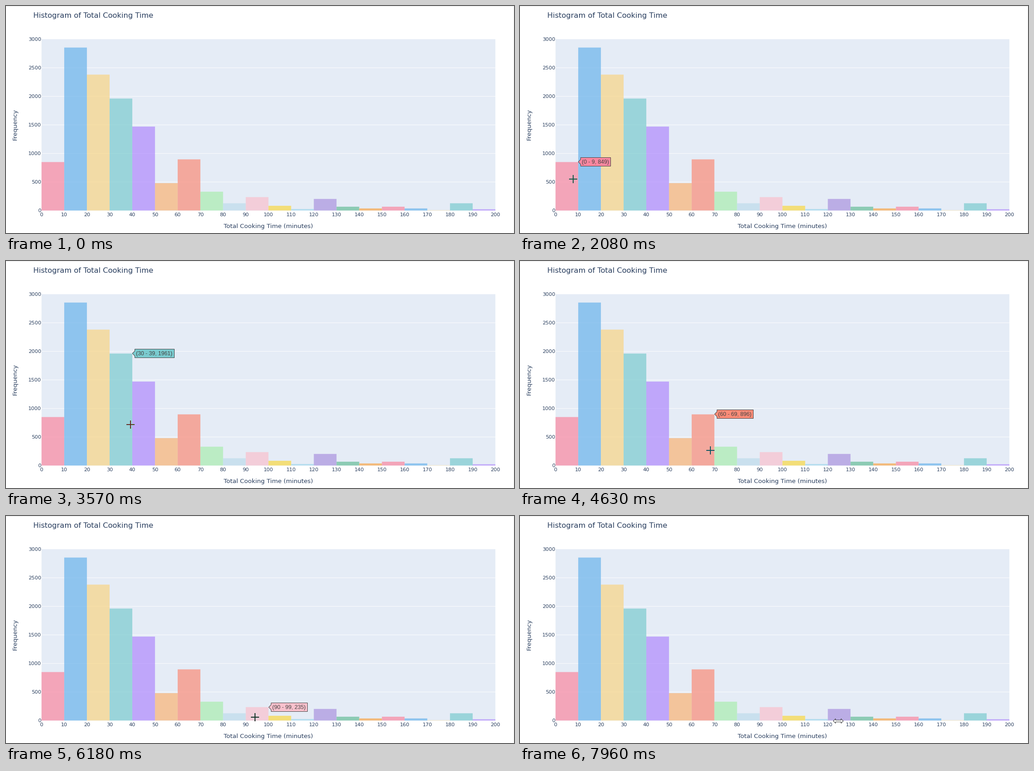
Recreate the animation shown at these times as a matplotlib script. Size 1118 by 501 pixels, loop 7.99 s.

```python
import matplotlib.pyplot as plt
import numpy as np
from matplotlib.animation import FuncAnimation
from matplotlib.colors import to_rgb

W, H, DPI = 1118, 501, 64
PX = 72 / DPI  # points per pixel
FRAMES, STEP = 235, 34
LEFT, RIGHT, TOP, BASE = 78.2, 1077, 73.3, 451.4
BIN = (RIGHT - LEFT) / 20
INK, OUTLINE = "#2a3f5f", "#444444"
LAG = 50  # ms before the hover label follows the pointer

COUNTS = [849, 2854, 2380, 1961, 1470, 480, 896, 330, 127, 235,
          83, 27, 203, 67, 37, 67, 37, 5, 127, 22]
PALETTE = ("#fa87a0 #6ab3eb #f8d584 #7acbcf #af89fd #f9b474 #f98b77 #a9edaf "
           "#bddceb #f9c1cd #f9d943 #a3d7ed #a992de #67be98 #f9a545").split()

# key points of the pointer path: ms, x, y
TRACK = np.array([
    (140, 671, 492), (200, 493, 484), (550, 493, 484),
    (1310, 111, 463), (1450, 111, 463), (1640, 90, 452),
    (2240, 132, 362), (2730, 173, 337), (3050, 241, 330),
    (3570, 271, 359), (3930, 341, 406), (4240, 341, 406),
    (4630, 417, 418), (5030, 481, 435), (5840, 521, 444),
    (6400, 559, 444), (6680, 559, 444), (7960, 700, 452)], float)
TIMES, SPOTS = TRACK[:, 0], TRACK[:, 1:]
SLOPES = np.gradient(SPOTS, TIMES, axis=0)
rest = np.all(np.diff(SPOTS, axis=0) == 0, axis=1)
SLOPES[:-1][rest] = 0
SLOPES[1:][rest] = 0


def pointer(t):
    """Smooth position along the path, None before the pointer enters."""
    if t < TIMES[0]:
        return None
    t = min(t, TIMES[-1])
    i = min(np.searchsorted(TIMES, t, side="right") - 1, len(TIMES) - 2)
    dt = TIMES[i + 1] - TIMES[i]
    u = (t - TIMES[i]) / dt
    a, b = SPOTS[i], SPOTS[i + 1]
    return (a + (b - a) * u * u * (3 - 2 * u)
            + dt * u * (1 - u) * ((1 - u) * SLOPES[i] - u * SLOPES[i + 1]))


def level(count):
    return BASE - count * (BASE - TOP) / 3000


def edge(k):
    return LEFT + k * BIN


def bar_color(k):
    return to_rgb(PALETTE[k % len(PALETTE)])


# static chart
scene = np.ones((H, W, 3))


def cover(a, b, n):
    """Share of each of n pixels that lies between a and b."""
    i = np.arange(n)
    return np.clip(np.minimum(b, i + 1) - np.maximum(a, i), 0, 1)


def fill(x0, y0, x1, y1, color, alpha=1.0):
    weight = alpha * np.outer(cover(y0, y1, H), cover(x0, x1, W))[..., None]
    scene[:] += (np.array(to_rgb(color)) - scene) * weight


fill(0, 0, W, 1, "#e6e6e6")
fill(W - 1, 0, W, H, "#f0f0f0")
fill(LEFT, TOP, RIGHT, BASE, "#e5ecf6")
for value in range(500, 3000, 500):
    fill(LEFT, level(value) - 0.47, RIGHT, level(value) + 0.47, "white")
for k, count in enumerate(COUNTS):
    fill(edge(k), level(count), edge(k + 1), BASE, bar_color(k), 0.7)

plt.rcParams["font.family"] = "DejaVu Sans"
fig = plt.figure(figsize=(W / DPI, H / DPI), dpi=DPI, facecolor="white")
ax = fig.add_axes([0, 0, 1, 1])
ax.axis("off")


def picture(pixels, **kw):
    h, w = pixels.shape[:2]
    return ax.imshow(pixels, extent=(0, w, h, 0), aspect="auto",
                     interpolation="nearest", **kw)


picture(scene)
cross = picture(np.zeros((18, 18, 4)), zorder=6)
ax.set_xlim(0, W)
ax.set_ylim(H, 0)


def label(x, y, text, size, **kw):
    kw = {"color": INK, "va": "baseline", **kw}
    return ax.text(x, y, text, fontsize=size * PX, **kw)


label(60, 26, "Histogram of Total Cooking Time", 16.2)
label(577.5, 490, "Total Cooking Time (minutes)", 13.35, ha="center")
label(20.7, 262, "Frequency", 13.3, rotation=90, ha="center", va="center")
for value in range(0, 3001, 500):
    label(77.3, level(value) + 4, str(value), 11.3, ha="right")
for k in range(21):
    label(edge(k), 464.4, str(10 * k), 11.3, ha="center")


# moving parts
def shape(border, width, zorder):
    return ax.fill([0], [0], facecolor="white", edgecolor=border,
                   linewidth=width * PX, joinstyle="miter", zorder=zorder)[0]


ARROW = np.array([(0, 0), (0, 16), (3.7, 12.6), (6.2, 18), (8.6, 17),
                  (6.2, 11.7), (11.4, 11.7)])
half = np.array([(6, -2), (6, -5), (11, 0), (6, 5), (6, 2)])
RESIZE = np.vstack([half, -half])
cursor = shape("#222222", 0.9, 6)
tip = shape(OUTLINE, 1, 4)
tip_text = label(0, 0, "", 12.3, color=OUTLINE, family="Liberation Sans", zorder=5)


def advance(text):
    return 12.3 * sum(0.556 if c.isdigit() else 0.333 if c in "()-" else 0.278
                      for c in text)


def show_tip(k):
    text = f"({10 * k} - {10 * k + 9}, {COUNTS[k]})"
    x, y = round(edge(k + 1)), round(level(COUNTS[k]))
    x0 = x + 5.5
    x1 = round(x0 + advance(text) + 5.5) + 0.5
    tip.set_xy([(x + 0.3, y), (x0, y - 5.5), (x0, y - 9.5), (x1, y - 9.5),
                (x1, y + 9.5), (x0, y + 9.5), (x0, y + 5.5)])
    tip.set_facecolor(bar_color(k))
    tip_text.set_text(text)
    tip_text.set_position((x + 8.5, y + 4.4))


def show_cross(x, y):
    """Crosshair that inverts whatever lies beneath it."""
    x0, y0 = round(x) - 9, round(y) - 9
    patch = np.zeros((18, 18, 4))
    patch[..., :3] = 1 - scene[y0:y0 + 18, x0:x0 + 18]
    patch[8:10, :, 3] = patch[:, 8:10, 3] = 1
    cross.set_data(patch)
    cross.set_extent((x0, x0 + 18, y0 + 18, y0))


def draw(i):
    t = (i + 0.5) * STEP
    spot, late = pointer(t), pointer(t - LAG)
    inside = spot is not None and spot[1] < BASE
    hover = inside and late[1] < BASE
    cross.set_visible(inside)
    cursor.set_visible(spot is not None and not inside)
    tip.set_visible(hover)
    tip_text.set_visible(hover)
    if inside:
        show_cross(*spot)
    elif spot is not None:
        outline = RESIZE if spot[1] <= 470 else ARROW
        cursor.set_xy(np.round(spot) + 0.5 + outline)
    if hover:
        show_tip(int((late[0] - LEFT) / BIN))
    return cross, cursor, tip, tip_text


anim = FuncAnimation(fig, draw, frames=FRAMES, interval=STEP, repeat=True,
                     repeat_delay=0, blit=False)
plt.show()
```
